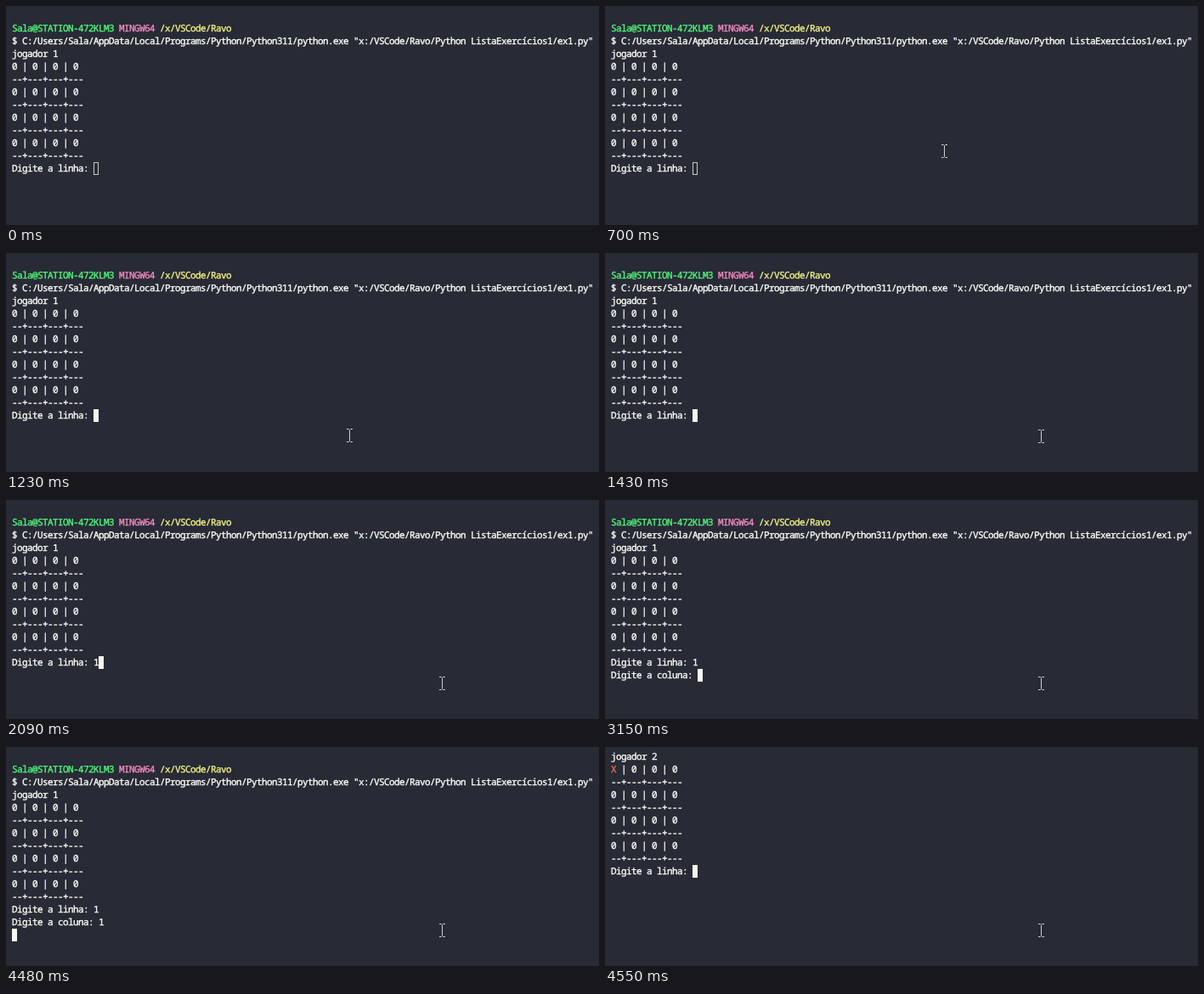
An HTML page for the animation above (8000 ms loop, 698 by 258 pixels).

```html
<!DOCTYPE html>
<html lang="pt">
<head>
<meta charset="utf-8">
<title>Terminal</title>
<style>
  html, body { margin: 0; width: 100%; height: 100%; overflow: hidden; background: #282a36; }
  #stage { position: relative; width: 698px; height: 258px; overflow: hidden; background: #282a36; }
  #screen {
    position: absolute; left: 7px; top: 4px; margin: 0;
    font: 11px/15px "Noto Sans Mono", "DejaVu Sans Mono", monospace;
    letter-spacing: -0.6px; white-space: pre; color: #fffff8;
    -webkit-text-stroke: 0.35px currentColor;
    font-variant-ligatures: none; text-rendering: geometricPrecision;
  }
  #screen div { height: 15px; }
  .host { color: #50fa7b; }
  .shell { color: #f28cc0; }
  .path { color: #f4f484; }
  .mark { color: #e0704c; }
  #caret { position: absolute; width: 6px; height: 15px; box-sizing: border-box; border: 1px solid #c6cebc; }
  #caret.solid { background: #f8f8f2; border-color: #f8f8f2; }
  svg { position: absolute; left: 0; top: 0; }
</style>
</head>
<body>
<div id="stage">
  <div id="screen"></div>
  <div id="caret"></div>
  <svg width="698" height="258">
    <circle id="click" cx="374" cy="207" r="12" fill="#8d8b20"/>
    <path id="beam" d="M-3.5 -7.5H-1L0 -6.5L1 -7.5H3.5M0 -6.5V6.5M-3.5 7.5H-1L0 6.5L1 7.5H3.5"
          fill="none" stroke="#d0d0ce"/>
  </svg>
</div>
<script>
const LOOP = 8000, CELL = 6, ROW = 15;
const $ = id => document.getElementById(id);
const span = (cls, text) => `<span class="${cls}">${text}</span>`;

const header = [
  "",
  `${span("host", "Sala@STATION-472KLM3")} ${span("shell", "MINGW64")} ${span("path", "/x/VSCode/Ravo")}`,
  '$ C:/Users/Sala/AppData/Local/Programs/Python/Python311/python.exe "x:/VSCode/Ravo/Python ListaExercícios1/ex1.py"'
];

function board(player, first) {
  const lines = ["jogador " + player];
  for (let r = 0; r < 4; r++) {
    lines.push((r ? "0" : first) + " | 0 | 0 | 0", "--+---+---+---");
  }
  return lines;
}

const start = [...header, ...board(1, "0")];
const next = board(2, span("mark", "X"));
const askRow = "Digite a linha: ", askCol = "Digite a coluna: ";

// time, lines, caret column, caret row
const screens = [
  [0, [...start, askRow], 16, 12],
  [2090, [...start, askRow + "1"], 17, 12],
  [3150, [...start, askRow + "1", askCol], 17, 13],
  [3680, [...start, askRow + "1", askCol + "1"], 18, 13],
  [4480, [...start, askRow + "1", askCol + "1", ""], 0, 14],
  [4550, [...next, askRow], 16, 9]
];

// time, x, y of the pointer
const pointer = [
  [500, 632, 121], [570, 538, 126], [640, 443, 148], [700, 399, 171],
  [770, 380, 194], [840, 374, 207], [970, 376, 208], [1170, 384, 210],
  [1230, 404, 215], [1290, 431, 220], [1360, 486, 220], [1430, 513, 216]
];
const FOCUS = 970, RELEASE = 1100;

const stepAt = (table, t) => table.filter(s => s[0] <= t).pop();
const show = (el, on) => { el.style.visibility = on ? "visible" : "hidden"; };
const origin = performance.now();
let shown = null;

function draw(now) {
  const t = Math.max(0, now - origin) % LOOP;
  const screen = stepAt(screens, t);
  if (screen !== shown) {
    const [, lines, col, row] = shown = screen;
    $("screen").innerHTML = lines.map(line => `<div>${line}</div>`).join("");
    $("caret").style.left = 7 + col * CELL + "px";
    $("caret").style.top = 4 + row * ROW + "px";
  }
  $("caret").classList.toggle("solid", t >= FOCUS);
  show($("click"), t >= FOCUS && t < RELEASE);

  const p = stepAt(pointer, t);
  show($("beam"), p);
  if (p) $("beam").setAttribute("transform", `translate(${p[1] + 0.5} ${p[2]})`);
  requestAnimationFrame(draw);
}
draw(origin);
</script>
</body>
</html>
```
